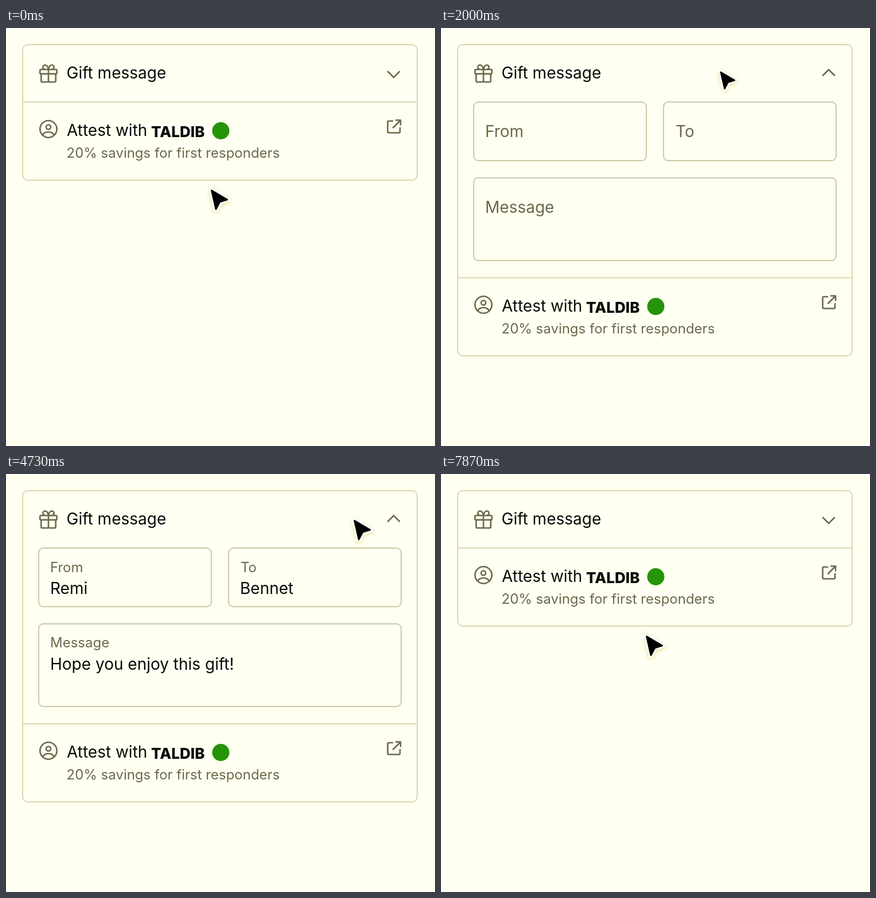
Recreate the animation shown at these times as an HTML page. Size 748 by 728 pixels, loop 7910 ms.

```html
<!DOCTYPE html>
<html lang="en">
<head>
<meta charset="utf-8">
<title>Gift message panel</title>
<style>
  :root { --loop: 7910ms; --bg: #fffff2; --ink: #0a0a06; --soft: #6a6a48; --line: #d9d9b0; --field: #cbcba4; }
  html, body { margin: 0; width: 100%; height: 100%; overflow: hidden; background: var(--bg); }
  svg { display: block; width: 748px; height: 728px; }
  text { font: 28px Inter, "Open Sans", sans-serif; fill: var(--ink); }
  .soft { fill: var(--soft); }
  .small { font-size: 24px; }
  .brand { font-size: 26px; font-weight: 800; }
  .icon { fill: none; stroke: var(--soft); stroke-width: 2.6; stroke-linecap: round; stroke-linejoin: round; }
  .card { fill: none; stroke: var(--line); stroke-width: 2; }
  .fields rect { fill: none; stroke: var(--field); stroke-width: 2; }

  .opened, .closed, .row, .value, .label, .cursor, .press { animation: var(--loop) linear infinite; }
  .opened { animation-name: show; animation-timing-function: step-end; }
  .closed { animation-name: hide; animation-timing-function: step-end; }
  .row { animation-name: row; animation-timing-function: step-end; }
  .value { animation-name: fill; }
  .label { animation-name: float; }
  .cursor { animation-name: travel; animation-timing-function: cubic-bezier(.65, 0, .35, 1); }
  .press {
    animation-name: press; animation-timing-function: ease-in-out; transform-origin: 15px 18px;
    stroke-linejoin: round; filter: drop-shadow(0 2px 3px rgba(205, 195, 60, .5));
  }

  @keyframes show { 0%, 72.06%, 100% { opacity: 0 } 23.39% { opacity: 1 } }
  @keyframes hide { 0%, 72.06%, 100% { opacity: 1 } 23.39% { opacity: 0 } }
  @keyframes row {
    0%, 72.06%, 100% { transform: translateY(0) }
    23.39% { transform: translateY(306px) }
  }
  @keyframes fill { 0%, 41.09% { opacity: 0 } 42.98%, 100% { opacity: 1 } }
  @keyframes float {
    0%, 41.09% { transform: none }
    42.98%, 100% { transform: translateY(-19px) scale(.857) }
  }
  @keyframes travel {
    0%, 6.95% { transform: translate(357px, 281px) }
    17.07%, 25.03% { transform: translate(485px, 73px) }
    33.63%, 41.49% { transform: translate(189px, 188px) }
    64.98%, 79.01% { transform: translate(629px, 73.4px) }
    96.08%, 100% { transform: translate(357px, 281px) }
  }
  @keyframes press {
    0%, 21.49%, 26.3%, 70.16%, 75.09%, 100% { transform: scale(1) }
    23.39%, 24.4%, 71.93%, 73.2% { transform: scale(.8) }
  }
</style>
</head>
<body>
<svg viewBox="0 0 748 728">
  <defs><path id="arrow" d="M1.5 2L28.7 18 15.7 22 9 34.5Z"/></defs>

  <!-- Header -->
  <g class="icon">
    <rect x="59.3" y="72.3" width="29.4" height="7.6" rx="1.5"/>
    <path d="M61.3 80v12a2 2 0 0 0 2 2h21.4a2 2 0 0 0 2-2V80M74 72.5V94"/>
    <path d="M74 72c-1-5-3-7.5-6-7.5a3.7 3.7 0 0 0 0 7.5M74 72c1-5 3-7.5 6-7.5a3.7 3.7 0 0 1 0 7.5"/>
  </g>
  <text x="105.5" y="88">Gift message</text>

  <g class="closed">
    <rect class="card" x="29" y="29" width="688" height="236" rx="9"/>
    <path class="card" d="M29 129H717"/>
    <path class="icon" d="M666 76l10 10 10-10"/>
  </g>

  <g class="opened">
    <rect class="card" x="29" y="29" width="688" height="542" rx="9"/>
    <path class="card" d="M29 435H717"/>
    <path class="icon" d="M666 82.5l10-10 10 10"/>
    <g class="fields">
      <rect x="57" y="129" width="301" height="102" rx="8"/>
      <rect x="388" y="129" width="301" height="102" rx="8"/>
      <rect x="57" y="261" width="632" height="144" rx="8"/>
    </g>
    <g transform="translate(77 189.5)"><text class="soft label">From</text></g>
    <g transform="translate(409 189.5)"><text class="soft label">To</text></g>
    <g transform="translate(77 321.5)"><text class="soft label">Message</text></g>
    <g class="value">
      <text x="77" y="208.5">Remi</text>
      <text x="408" y="208.5">Bennet</text>
      <text x="77" y="340.5">Hope you enjoy this gift!</text>
    </g>
  </g>

  <!-- Discount row -->
  <g class="row">
    <g class="icon">
      <circle cx="74" cy="176" r="14.7"/>
      <circle cx="74" cy="172.5" r="4"/>
      <path d="M64 186.5c2-4 5.5-5.5 10-5.5s8 1.5 10 5.5"/>
      <path d="M674 162h-6.5a2 2 0 0 0-2 2v16.5a2 2 0 0 0 2 2H685a2 2 0 0 0 2-2V174M680 160.5h8v8M687.5 161L675 173.5"/>
    </g>
    <text x="106" y="188">Attest with</text>
    <text class="brand" x="253" y="189.5">TALDIB</text>
    <circle cx="374.5" cy="179" r="15" fill="#249408"/>
    <text class="soft small" x="105.5" y="226">20% savings for first responders</text>
  </g>

  <!-- Pointer -->
  <g class="cursor">
    <g class="press">
      <use href="#arrow" fill="#fff" stroke="#fff" stroke-width="9"/>
      <use href="#arrow" fill="#000" stroke="#000" stroke-width="2.8"/>
    </g>
  </g>
</svg>
</body>
</html>
```
